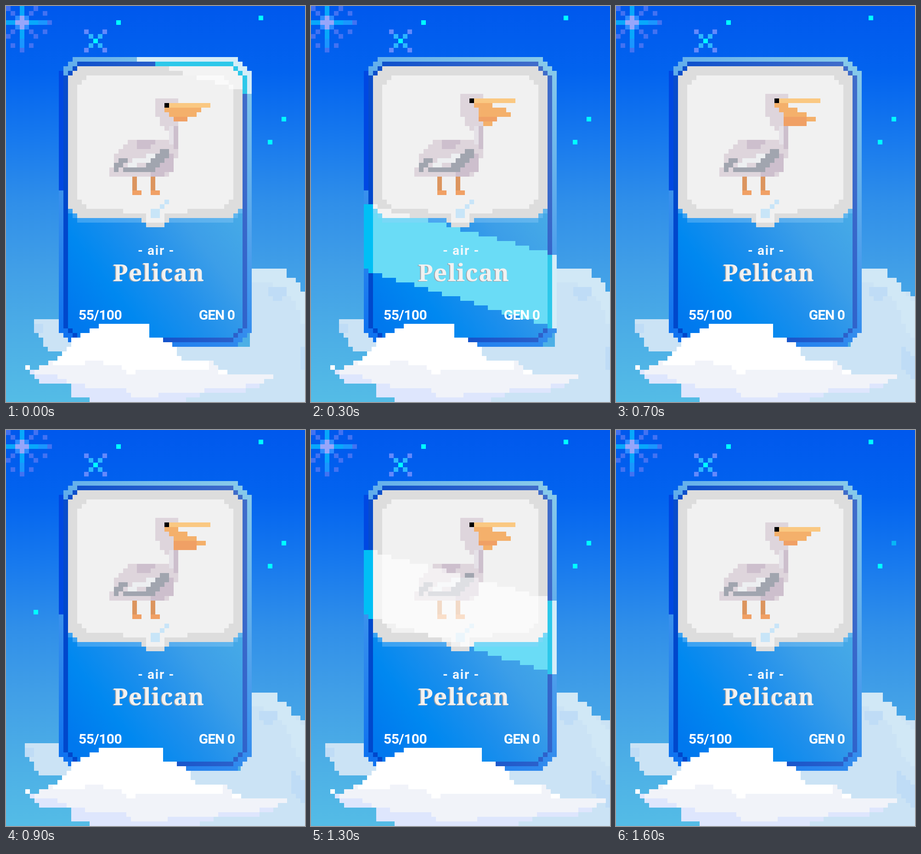
These frames come from a looping animation (651 by 861 pixels, 1.7 s). An HTML page with a canvas:

```html
<!DOCTYPE html>
<html lang="en">
<head>
<meta charset="utf-8">
<title>Pelican card</title>
<style>
html, body { margin: 0; height: 100%; overflow: hidden; }
canvas { display: block; }
</style>
</head>
<body>
<canvas id="stage" width="651" height="861"></canvas>
<script>
const ctx = document.getElementById('stage').getContext('2d');
const COLS = 65, ROWS = 86, LOOP = 1700;
const CARD = 5, FRONT = 2, BACK = 1;   // horizontal grid offsets in px
let offset = 0;

const px = c => Math.floor(offset + c * 651 / COLS);
const py = r => Math.ceil(r * 861 / ROWS);

function rect(color, c, r, w = 1, h = 1) {
  ctx.fillStyle = color;
  ctx.fillRect(px(c), py(r), px(c + w) - px(c), py(r + h) - py(r));
}

// Adds every grid square whose centre lies inside the polygon to the path.
function trace(points, shift = x => x) {
  const p = points.split(' ').map(Number), n = p.length;
  ctx.beginPath();
  for (let r = 0; r < ROWS; r++) {
    const y = r + .5, hits = [];
    for (let i = 0; i < n; i += 2) {
      const x0 = shift(p[i]), y0 = p[i + 1];
      const x1 = shift(p[(i + 2) % n]), y1 = p[(i + 3) % n];
      if (y0 <= y !== y1 <= y) hits.push(x0 + (y - y0) / (y1 - y0) * (x1 - x0));
    }
    hits.sort((a, b) => a - b);
    for (let i = 0; i < hits.length; i += 2) {
      const a = Math.ceil(hits[i] - .5), b = Math.floor(hits[i + 1] - .5) + 1;
      if (b > a) ctx.rect(px(a), py(r), px(b) - px(a), py(r + 1) - py(r));
    }
  }
}

function poly(color, points, shift) {
  trace(points, shift);
  ctx.fillStyle = color;
  ctx.fill();
}

function octagon(color, c, r, w, h, cut) {
  const R = c + w, B = r + h;
  poly(color, [c + cut, r, R - cut, r, R, r + cut, R, B - cut,
    R - cut, B, c + cut, B, c, B - cut, c, r + cut].join(' '));
}

function gradient(x0, y0, x1, y1, ...colors) {
  const g = ctx.createLinearGradient(x0, y0, x1, y1);
  colors.forEach((c, i) => g.addColorStop(i / (colors.length - 1), c));
  return g;
}

function mirrored(color, cx, cy, dx, dy) {
  for (const sx of [-1, 1])
    for (const sy of [-1, 1]) rect(color, cx + sx * dx, cy + sy * dy);
}

function sky(t) {
  offset = 0;
  rect(gradient(0, 0, 0, 861, '#0058ed', '#0263ef', '#1779ee', '#308fe9', '#419fe7', '#4caee6', '#54bce6'), 0, 0, COLS, ROWS);

  const purple = '#4272f2', arm = ['#96a6fa', '#08a8fb', '#1a96ff', purple];
  for (let i = 1; i <= 3; i++) mirrored(i === 1 ? '#2d8cff' : purple, 3, 3, i, i);
  mirrored(purple, 3, 3, 5, 2);
  mirrored(purple, 3, 3, 2, 5);
  for (let i = 6; i >= 0; i--) {
    mirrored(arm[i >> 1], 3, 3, i, 0);
    mirrored(arm[i >> 1], 3, 3, 0, i);
  }

  const dim = t >= 100 && t < 300;
  const sparkle = dim ? ['#00b2ff', '#168df8', '#3c70f2'] : ['#00ffff', '#2cb6ff', '#6389fc'];
  sparkle.forEach((color, i) => mirrored(color, 19, 7, i, i));

  const star = (c, r, color = '#00ffff') => rect(color, c, r);
  const faint = (t >= 1100 && t < 1200) || t >= 1600;
  star(24, 3);
  star(55, 2);
  star(57, 29);
  star(60, 24, faint ? '#08b5f5' : '#00ffff');
  if (t >= 200 && t < 300) star(43, 10);
  if (t >= 900 && t < 1000) star(6, 39);
}

function backClouds(t) {
  offset = BACK;
  const drift = Math.min(3, Math.floor((t + 200) / 300 / 1.02 - .9) + 0);
  const shift = x => x - Math.max(0, drift);
  const base = '#cbe3f5', light = '#d1e8f6', dark = '#bfdcf6';
  poly(base, '53 57 61 57 61 59 63 59 64 62 67 63 70 64 70 86 30 86 30 74 53 74', shift);
  poly(light, '53 57 61 57 61 59 63 59 64 62 68 65 68 73 65 70 63 64 57 60 53 60', shift);
  poly(dark, '57 61 61 61 61 63 58 64', shift);
  poly(dark, '64 74 68 77 68 82 64 79', shift);
  poly(base, '7 68 20 68 20 75 9 75 8 72 6 71 6 69', shift);
  poly(dark, '6 69 8 69 8 71 6 71', shift);
}

function frontCloud(t) {
  offset = FRONT;
  const stretch = t < 700 ? 0 : t < 1000 ? 3 : t < 1500 ? 6 : 3;
  const shift = x => x > 30 ? x + stretch : x;
  poly('#dee6fd', '5 79 57 81 54 83 50 84 44 84 37 86 18 86 18 85 14 85 14 82 8 82 5 80', shift);
  poly('#f1f3f9', '8 78 10 77 44 77 48 80 58 80 58 81 50 83 36 84 30 85 27 85 26 83 20 83 14 82 10 80 6 80 6 79', shift);
  poly('#ffffff', '21 69 31 69 31 72 36 73 38 77 44 77 44 79 48 79 48 80 44 79 28 79 27 80 24 78 19 77 14 78 10 78 10 77.5 14 73 14 72.5', shift);
  rect('#ffffff', 4, 78);
}

function bird(t) {
  const light = '#ded5dc', shade = '#cdbfcd', grey = '#a1a5af';
  const orange = '#f4b06b', deep = '#f0a065';
  const up = t >= 300 && t < 1400;
  const half = up && (t < 400 || t >= 1200);
  const y = up ? 19 : 20;

  for (const c of [27, 31]) {
    rect('#dc955f', c, 37, 1, 3);
    rect(deep, c, 40, 2);
  }
  poly(light, '24 31.5 27 29 33 29 37 30 36 36 33 37 22 37 22 36 23 35 23 33');
  poly(shade, '28 29 33 29 30 31 28 31');
  poly(shade, '36 32 36 36 32 37 30 36 34 33');
  poly('#edeff1', '25 35 28 33 32 32 30 34 26 35');
  poly(grey, '35 31 35 32 31 36 25 36 25 35 30 35 34 31');
  poly(grey, '23 35 25 33 26 33 24 36');

  poly(light, `33 ${y} 37 ${y} 36 ${y + 2} 36 25 37 26 37 31 34 31 35 27 33 25 32 ${y + 3} 32 ${y + 1}`);
  rect('#e5e1e7', 35, 26, 1, 4);
  rect(shade, 36, 26, 1, 5);
  const pouch = !up ? '34 22 43 22 38 25 36 25'
    : half ? '34 21 36 21 41 22 43 24 40 24 40 25 38 26 36 24 36 22'
    : '34 21 36 21 42 24 43 25 41 25 41 26 36 26 36 23';
  poly(orange, pouch);
  rect(deep, 36, 24, up ? half ? 4 : 5 : 3, up && !half ? 2 : 1);
  rect('#fac882', 35, y + 1, 9);
  rect('#000000', 34, y + 1);
}

function face(color) {
  octagon(color, 13, 13, 38, 33, 3);
  rect(color, 29, 46, 6);
  rect(color, 30, 47, 4);
}

function card(t, lit) {
  offset = CARD;
  const tone = (shine, normal) => lit ? shine : normal;
  octagon(tone('#d4edf8', gradient(115, 741, 535, 110, '#0a6ff0', '#4a9cec', '#8ccdea')), 11, 11, 42, 63, 4);
  rect(tone('#00bff5', '#0048e2'), 11, 14, 1, 26);
  octagon(tone('#2dc8ea', gradient(125, 400, 525, 300, '#0048cc', '#3f6cca')), 12, 12, 40, 61, 4);
  if (lit) rect('#00bff5', 11, 15, 2, 55);
  octagon(tone('#6adcf6', gradient(160, 700, 500, 440, '#0078ee', '#0088f0', '#1e8fec', '#3c9ee8', '#46aae7')), 13, 13, 38, 59, 3);
  octagon('rgba(150,205,250,.35)', 13, 14, 38, 33, 3);

  const white = '#f1f1f1', gem = '#c8e5f8';
  face('#dddddd');
  octagon(white, 15, 15, 34, 29, 3);
  rect(white, 25, 44, 14);
  rect(white, 30, 45, 4, 2);
  rect(gem, 31, 44, 2, 2);
  rect(gem, 33, 43);
  rect(gem, 34, 42);
  bird(t);
  if (lit) face('rgba(255,255,255,.65)');
}

// A slanted band of light sweeps down the card every 1100 ms.
function shine(t) {
  const phase = Math.floor(t / 100) % 11;
  if (phase >= 5) return;
  const y = (phase - 2) * 17;
  ctx.save();
  trace(`11 ${y + 25.8} 53 ${y + 37} 53 ${y + 53} 11 ${y + 40.3}`);
  ctx.clip();
  card(t, true);
  ctx.restore();
}

function label(text, x, y, font, align, color = '#ffffff', spacing = 0) {
  ctx.font = font;
  ctx.textAlign = align;
  ctx.letterSpacing = spacing + 'px';
  ctx.fillStyle = color;
  ctx.fillText(text, x, y);
}

function labels() {
  const small = 'bold 30px Roboto, sans-serif', title = 'bold 51px "Noto Serif", serif';
  label('- air -', 327, 541, 'bold 28px Roboto, sans-serif', 'center', '#f4f8fc', 1.7);
  label('Pelican', 331, 599, title, 'center', '#9fa6ad', 1.5);
  label('Pelican', 333, 598, title, 'center', '#f1f1f1', 1.5);
  label('55/100', 158, 682, small, 'left', '#ffffff', -.5);
  label('GEN 0', 498, 682, small, 'right', '#ffffff', -1);
}

function draw() {
  const t = performance.now() % LOOP;
  sky(t);
  backClouds(t);
  card(t, false);
  shine(t);
  labels();
  frontCloud(t);
  requestAnimationFrame(draw);
}
draw();
</script>
</body>
</html>
```
